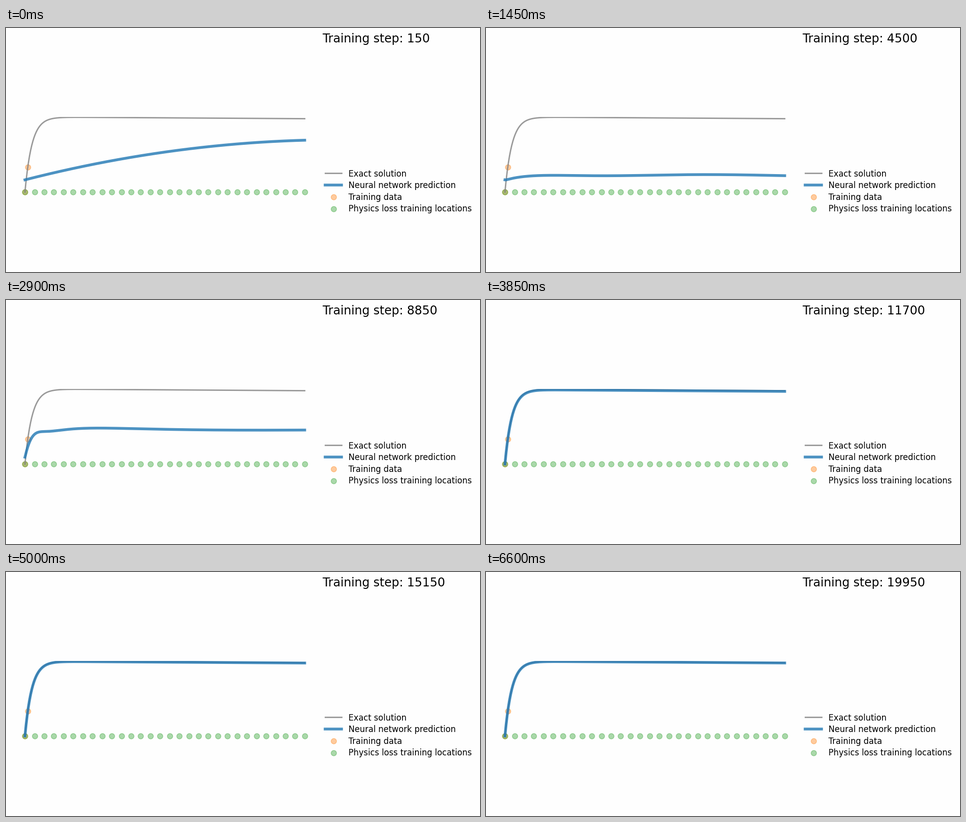
Recreate the animation shown at these times as a matplotlib script. Size 955 by 491 pixels, loop 6650 ms.

```python
import numpy as np
import matplotlib.pyplot as plt
from matplotlib.animation import FuncAnimation

W, H, DPI = 955, 491, 100
FRAMES, INTERVAL = 133, 50
STEPS_PER_FRAME = 150
LEFT, BOTTOM, AX_W, AX_H = 10, 10, 620, 302   # axes box in pixels
PX = 2 / AX_H                                 # one pixel in data units

x = np.linspace(0, 1, 500)
exact = np.exp(-0.0235 * x) - np.exp(-40 * x)

# Shapes the prediction passes through while training
early = 0.162 + 0.952 * x - 0.424 * x**2
flat = 0.166 + 0.128 * (1 - np.exp(-3 * x)) - 0.0757 * x
ripple = (0.226 - 0.003 * x + 0.015 * np.cos(12.44 * (np.sqrt(x) - 0.366))
          - 0.065 * np.exp(-36 * x))
rising = (0.463 - 0.36 * np.exp(-24 * x - (23.7 * x)**2)
          + (0.012 + 0.03 * np.exp(-8 * x)) * np.cos(3 * (np.log(x + 0.02) + 1.2)))
lag = 1.4 * PX * (1 - np.exp(-12 * x))


def mix(a, b, w):
    return a + (b - a) * w


def prediction(t):
    """Predicted curve at t milliseconds."""
    if t < 650:
        w = (1 - np.exp(-t / 200)) / (1 - np.exp(-650 / 200))
        return mix(early, flat, w)
    if t < 2150:
        return mix(flat, ripple, (t - 650) / 1500)
    if t < 2900:
        return mix(ripple, rising, ((t - 2150) / 750)**3)
    fit = exact - lag * mix(0.4, 1, np.exp(-max(t - 3850, 0) / 600))
    v = min((t - 2900) / 700, 1)
    return mix(rising, fit, 1.3 * v * (1 - v)**2 + v * v * (3 - 2 * v))


fig = plt.figure(figsize=(W / DPI, H / DPI), dpi=DPI, facecolor="#fefefe")
ax = fig.add_axes([LEFT / W, BOTTOM / H, AX_W / W, AX_H / H])
ax.set(xlim=(-0.05, 1.05), ylim=(-1, 1))
ax.axis("off")

ax.plot(x, exact, color="grey", lw=2, alpha=0.8, label="Exact solution")
line, = ax.plot(x, early, color="tab:blue", lw=4, alpha=0.8,
                label="Neural network prediction")
ax.scatter(x[[0, 5]], exact[[0, 5]], s=60, color="tab:orange", alpha=0.4,
           label="Training data")
ax.scatter(np.linspace(0, 1, 30), np.zeros(30), s=60, color="tab:green",
           alpha=0.4, label="Physics loss training locations")
legend = ax.legend(loc=(1.01, 0.338), frameon=False, fontsize="large",
                   labelspacing=0.324)
for label in legend.get_texts():
    label.set_y(-1)   # labels sit one pixel below the handles' baseline
title = ax.text(1.065, 2 - PX, "", fontsize="xx-large", color="k")


def update(i):
    line.set_ydata(prediction(i * INTERVAL))
    title.set_text(f"Training step: {(i + 1) * STEPS_PER_FRAME}")
    return line, title


anim = FuncAnimation(fig, update, frames=FRAMES, interval=INTERVAL,
                     repeat=True, repeat_delay=0)
plt.show()
```
